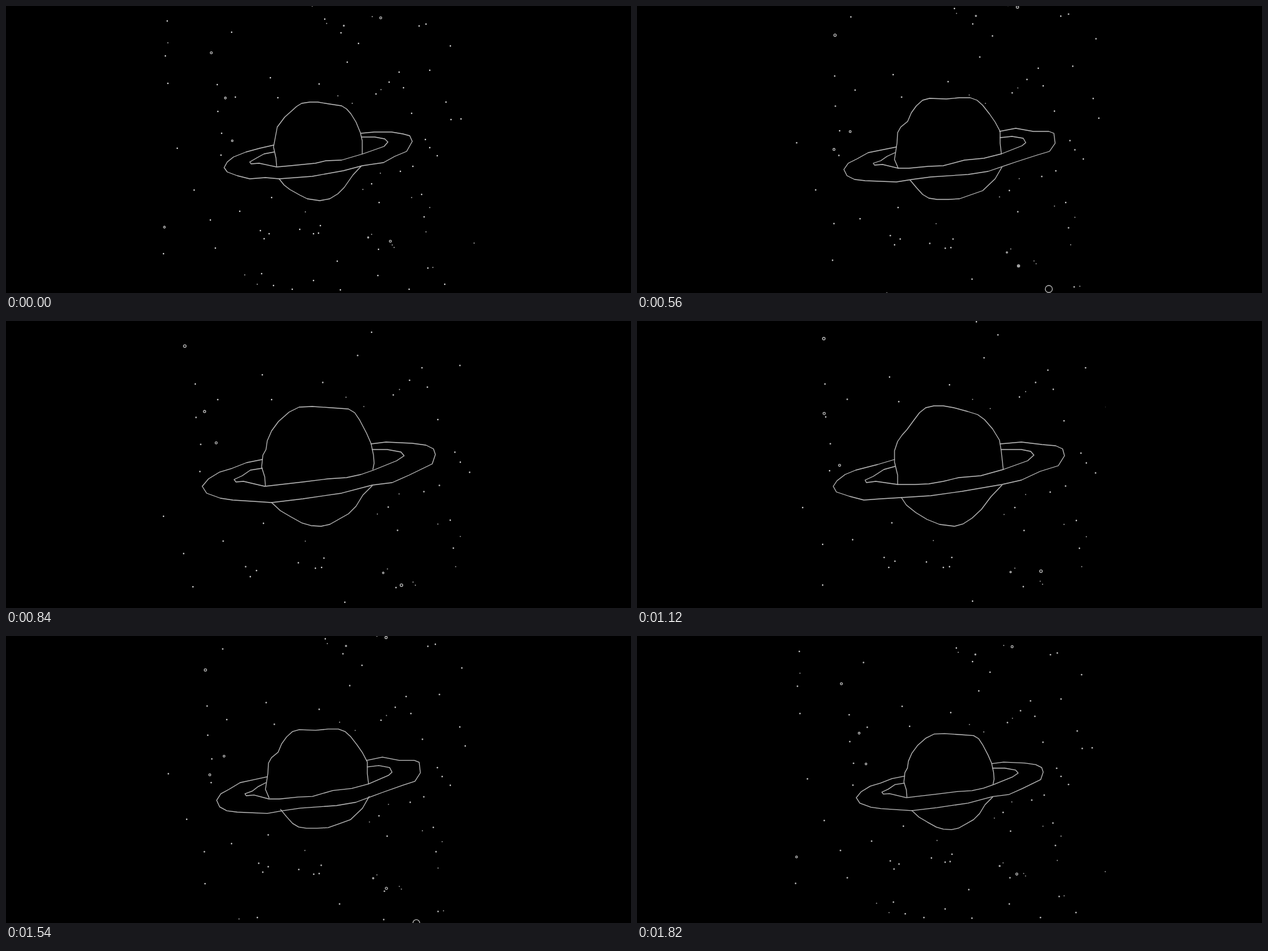
An HTML page without scripts for the animation above (1890 ms loop, 1000x460 px).

```html
<!DOCTYPE html>
<html lang="en">
<head>
<meta charset="utf-8">
<title>Ringed planet</title>
<style>
html, body { margin: 0; height: 100%; overflow: hidden; background: #000; }
svg { display: block; width: 100vw; height: 100vh; }
path, circle {
  fill: none; stroke: #b8b8b8; stroke-width: 1.3;
  stroke-linecap: round; stroke-linejoin: round;
  vector-effect: non-scaling-stroke;
}
.dots path { stroke-width: 2.5; stroke: #c4c4c4; }
.dots .tiny { stroke-width: 1.8; stroke: #a8a8a8; }

/* Everything advances on a 70 ms beat: 27 beats per loop. */
.sky, .globe, .ring, .drift { animation: 1890ms infinite; }
.sky, .globe, .ring { transform-origin: 500px 235px; }
.sky { animation-name: zoom; }
.globe { animation-name: swell, globe; --y: .975; }
.ring { animation-name: swell, ring; --y: 1.05; }
.drift { animation-name: drift; }

@keyframes zoom {
  0%     { scale: 1;     animation-timing-function: steps(4); }
  14.81% { scale: 1.067; animation-timing-function: steps(4); }
  29.62% { scale: 1.127; animation-timing-function: steps(4); }
  44.44% { scale: 1.24;  animation-timing-function: steps(2); }
  51.85% { scale: 1.265; animation-timing-function: steps(2); }
  59.25% { scale: 1.23;  animation-timing-function: steps(6); }
  81.48% { scale: 1.087; animation-timing-function: steps(4); }
  96.29% { scale: .997;  animation-timing-function: steps(1); }
  100%   { scale: 1; }
}
/* Scale on top of the size already in the drawn outlines. */
@keyframes swell {
  0%, 44.44% { scale: 1;            animation-timing-function: steps(2); }
  51.85% { scale: 1.02;             animation-timing-function: steps(2); }
  59.25% { scale: 1;                animation-timing-function: steps(6); }
  81.48% { scale: .9645 var(--y);   animation-timing-function: steps(4); }
  96.29% { scale: .803;             animation-timing-function: steps(1); }
  100%   { scale: 1; }
}
/* Parallax: each depth layer sets its own stops. */
@keyframes drift {
  0%     { translate: 0 0;      animation-timing-function: steps(4); }
  14.81% { translate: var(--a); animation-timing-function: steps(4); }
  29.62% { translate: var(--b); animation-timing-function: steps(4); }
  44.44% { translate: var(--c); animation-timing-function: steps(4); }
  59.25% { translate: var(--d); animation-timing-function: steps(6); }
  81.48% { translate: var(--e); animation-timing-function: steps(4); }
  96.29% { translate: var(--f); animation-timing-function: steps(1); }
  100%   { translate: 0 0; }
}
.far   { --a: -6px 6px;   --b: -3px 9px;   --c: 4.5px 0px; --d: -1px 2px;   --e: 0px 2px;    --f: 1px -2.5px; }
.low   { --a: 0px 0px;    --b: 2px 6px;    --c: 4px 0px;   --d: 0px 0px;    --e: 1px 5px;    --f: 1px -2px; }
.side  { --a: -2px -1px;  --b: -1px 0px;   --c: 3px 1px;   --d: 0px 0px;    --e: -2px -4px;  --f: 1px 0px; }
.right { --a: -4px 4px;   --b: 0px 4px;    --c: 5px 1px;   --d: 0px 2px;    --e: 4px -1px;   --f: 1px -2px; }
.near  { --a: 11px -12px; --b: 9px -7px;   --c: -1px 3px;  --d: 8px -8px;   --e: 5px -6px;   --f: -2px 1px; }
.orb1  { --a: -23px 49px; --b: -15px 83px; --c: 2px 15px;  --d: -14px 17px; --e: -11px 76px; --f: 4px 8px; }
.orb2  { --a: -8px 14px;  --b: -3px -11px; --c: 6px -13px; --d: -5px 16px;  --e: -1px -20px; --f: 4px -11px; }
.orb3  { --a: 1px -6px;   --b: -17px 19px; --c: -8px 10px; --d: 4px -7px;   --e: -15px 14px; --f: -7px 5px; }
.orb4  { --a: 8px -27px;  --b: 36px -41px; --c: 30px 0px;  --d: 10px 0px;   --e: 39px -28px; --f: 0px 0px; }

/* Hand-drawn outlines that redraw themselves: upper and lower globe. */
@keyframes globe {
  0%, 100% {
    animation-timing-function: steps(4);
    d: path("M433 257L432 244 428 226 431 210 434 194 446 178 455 170 465 161 473 156 486 154 499 154 517 157 537 160 545 165 552 173 560 186 567 203 570 216 570 230 570 237M437 277L445 287 454 294 470 303 482 309 502 312 518 309 531 301 541 291 555 271 568 257");
  }
  14.81% {
    animation-timing-function: steps(4);
    d: path("M426 256L424 240 422 222 422 206 427 196 439 186 446 174 455 161 463 153 475 149 490 150 507 152 523 154 536 160 549 170 560 182 567 191 572 205 573 220 575 237M434 274L442 284 452 293 464 303 480 309 498 311 513 311 533 301 551 288 565 271 575 256");
  }
  29.62%, 81.48% {
    animation-timing-function: steps(4);
    d: path("M418 260L412 246 416 220 417 203 422 194 433 185 439 171 447 160 457 151 468 148 495 149 516 147 533 147 544 151 553 159 564 173 573 186 581 201 581 220 583 237M437 279L447 291 457 302 467 308 480 310 498 310 516 309 533 303 553 296 573 277 584 258");
  }
  44.44%, 96.29% {
    d: path("M415 264L414 250 409 234 411 215 416 206 418 192 425 176 436 161 453 146 469 138 490 137 520 139 548 141 558 147 566 159 577 180 584 196 588 215 589 228 587 238M425 291L439 304 456 314 474 324 488 328 504 329 518 326 548 309 560 297 571 279 586 264");
  }
  44.44% { animation-timing-function: steps(4); }
  96.29% { animation-timing-function: steps(1); }
  59.25% {
    animation-timing-function: steps(6);
    d: path("M417 262L417 247 412 226 412 208 417 193 424 183 432 174 443 159 452 147 462 139 475 136 490 136 507 139 529 145 545 150 556 158 569 173 580 191 583 210 586 238M423 283L431 295 446 307 464 318 484 326 508 329 522 325 536 316 551 302 566 282 584 263");
  }
}
/* Outer and inner edge of the ring. */
@keyframes ring {
  0%, 100% {
    animation-timing-function: steps(4);
    d: path("M428 223L406 228 384 234 364 242 354 250 349 259 354 266 370 272 390 277 415 275 437 277 490 273 540 264 570 256 604 251 622 241 641 233 650 217 646 208 635 205 617 202 589 202 568 204M429 234L413 237 402 243 390 250 392 253 405 252 433 258 455 256 475 254 495 252 512 248 537 247 571 237 605 225 611 218 606 213 590 210 569 210");
  }
  14.81% {
    animation-timing-function: steps(4);
    d: path("M423 225L397 234 375 237 358 246 343 252 340 261 345 270 358 274 375 277 405 275 434 274 490 269 545 262 577 256 610 244 634 236 650 231 659 218 656 206 647 204 625 202 601 198 572 202M423 233L409 239 398 244 384 251 387 254 398 253 426 256 447 256 465 255 487 251 510 246 545 242 576 236 609 225 615 218 609 212 598 210 573 210");
  }
  29.62%, 81.48% {
    animation-timing-function: steps(4);
    d: path("M415 226L390 231 370 235 352 245 338 252 331 262 336 272 348 278 365 280 415 282 440 278 470 274 530 270 562 265 606 250 640 239 660 233 669 220 667 204 659 201 634 201 606 196 580 201M413 235L400 241 390 248 378 252 380 255 393 254 418 260 435 260 466 257 490 256 524 247 555 244 583 237 616 224 622 219 618 212 600 209 581 211");
  }
  44.44%, 96.29% {
    d: path("M410 222L385 227 362 236 342 242 324 253 314 265 321 276 343 284 363 287 395 289 425 291 475 285 537 276 586 263 618 259 645 247 682 229 687 214 684 205 672 199 650 196 608 194 584 197M410 236L391 239 378 248 365 254 368 258 380 257 414 265 440 262 475 258 515 253 545 251 568 246 588 239 625 224 637 216 632 210 610 206 586 206");
  }
  44.44% { animation-timing-function: steps(4); }
  96.29% { animation-timing-function: steps(1); }
  59.25% {
    animation-timing-function: steps(6);
    d: path("M412 222L385 230 350 239 333 246 320 256 314 265 319 274 340 281 363 287 390 285 423 283 470 280 520 273 584 262 615 255 645 241 674 232 684 216 681 205 670 200 648 198 615 194 581 197M413 233L395 238 378 249 365 255 367 259 382 257 417 262 445 262 467 261 490 257 515 251 550 248 586 238 625 224 635 215 630 209 615 206 583 206");
  }
}
</style>
</head>
<body>
<svg viewBox="0 0 1000 460">
  <clipPath id="pane"><rect x="250" width="500" height="460"/></clipPath>
  <g clip-path="url(#pane)">
    <g class="sky dots">
      <g class="drift far">
        <path d="M510 21h0M536 43h0M661 32h0M672 29h0M564 60h0M711 64h0M546 90h0M678 103h0M629 106h0M613 122h0M592 141h0M636 131h0M423 115h0M501 125h0M435 147h0"/>
        <path class="tiny" d="M490 0h0M513 28h0M586 17h0M600 134h0M531 144h0M554 156h0"/>
        <circle cx="599.5" cy="19" r="1.7"/>
        <circle cx="540.5" cy="31.5" r=".9"/>
      </g>
      <g class="drift low">
        <path d="M425 307h0M470 358h0M503 352h0M492 365h0M500 364h0M596 390h0M530 409h0M595 432h0M675 420h0M702 446h0M645 454h0M535 455h0M458 454h0M428 448h0M409 429h0M492 440h0"/>
        <path class="tiny" d="M479 330h0M585 366h0M618 383h0M621 387h0M683 419h0M749 380h0M402 446h0M382 431h0"/>
        <circle cx="579.5" cy="371" r="1"/>
      </g>
      <g class="drift right">
        <path d="M704 154h0M649 172h0M712 182h0M728 181h0M671 214h0M678 227h0M690 240h0M651 257h0M631 265h0M585 285h0M665 302h0M597 315h0M669 338h0"/>
        <path class="tiny" d="M599 268h0M571 294h0M649 307h0M678 323h0M672 362h0"/>
      </g>
      <g class="drift side">
        <path d="M258 24h0M361 42h0M255 80h0M259 124h0M338 126h0M367 146h0M339 169h0M345 204h0M344 239h0M374 329h0M335 388h0M252 397h0"/>
        <path class="tiny" d="M259 59h0"/>
        <circle cx="253.5" cy="354.5" r="1.5"/>
      </g>
      <g class="drift near">
        <path d="M274 228h0M301 295h0M327 343h0M407 360h0M421 365h0M413 373h0"/>
        <circle cx="328.5" cy="75" r="1.7"/>
      </g>
      <circle class="drift orb1" cx="351" cy="147.5" r="1.5"/>
      <circle class="drift orb2" cx="362" cy="216" r="1.4"/>
      <circle class="drift orb3" cx="615" cy="377" r="1.7"/>
      <circle class="drift orb4" cx="605" cy="470" r="5"/>
    </g>
    <path class="globe"/>
    <path class="ring"/>
  </g>
</svg>
</body>
</html>
```
